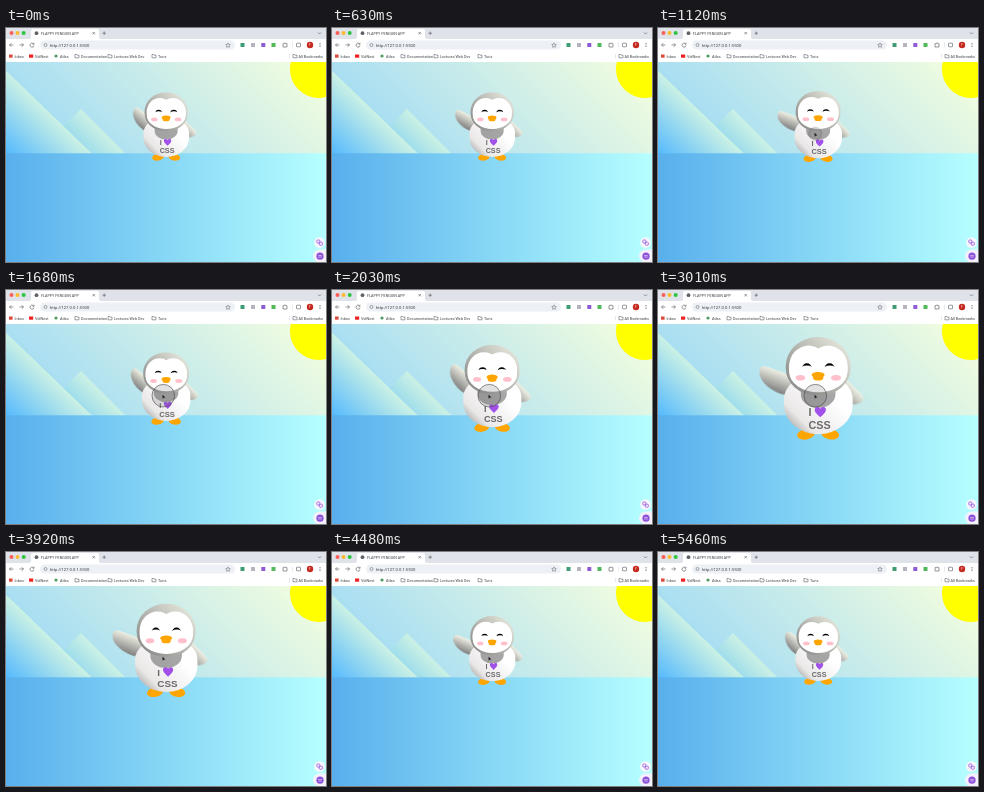
Recreate the animation shown at these times as an HTML page. Size 320x234 px, loop 5530 ms.

```html
<!DOCTYPE html>
<html lang="en">
<head>
<meta charset="utf-8">
<title>Flappy Penguin</title>
<style>
:root { --loop: 5530ms; --face: white; --beak: orange; --skin: gray; --pale: rgb(239, 240, 228); }
html, body { margin: 0; width: 100%; height: 100%; overflow: hidden; background: white; }
.stage { position: relative; width: 320px; height: 234px; overflow: hidden; }
.overlay { position: absolute; inset: 0; }
.overlay text { font-family: Roboto, Inter, sans-serif; fill: #3c4043; }

/* Web page, laid out at full size and scaled down */
.page { position: absolute; top: 34px; width: 320px; height: 200px; overflow: hidden; }
.world {
  position: absolute; width: 1111px; height: 769px;
  transform: scale(.288); transform-origin: 0 0;
  background: linear-gradient(45deg, rgb(118, 201, 255), rgb(247, 255, 222));
}
.world div { position: absolute; }
.mountain { width: 300px; height: 300px; }
.mountain.back {
  left: 110px; top: 225px; transform: rotate(45deg);
  background: linear-gradient(rgb(203, 241, 228), rgb(47, 170, 255));
}
.mountain.front {
  top: 175px; transform: skew(0deg, 44deg);
  background: linear-gradient(rgb(203, 241, 228), rgb(80, 183, 255));
}
.sun { width: 200px; height: 200px; top: -75px; right: -75px; border-radius: 50%; background: yellow; }
.ground {
  top: 317px; width: 100%; height: 452px;
  background: linear-gradient(90deg, rgb(88, 175, 236), rgb(182, 255, 255));
}

.penguin {
  width: 300px; height: 300px; left: 405.5px; top: 75px; z-index: 4;
  animation: grow var(--loop) ease-in-out infinite;
}
.head {
  width: 50%; height: 45%; top: 10%; left: 25%; z-index: 1;
  border-radius: 70% 70% 65% 65%;
  background: linear-gradient(45deg, var(--skin), var(--pale));
}
.face { width: 60%; height: 70%; top: 15%; border-radius: 70% 70% 60% 60%; background: var(--face); }
.face.left { left: 5%; }
.face.right { right: 5%; }
.chin { width: 90%; height: 70%; top: 25%; left: 5%; border-radius: 70% 70% 100% 100%; background: var(--face); }
.eye { width: 15%; height: 17%; top: 45%; border-radius: 50%; background: black; }
.eye.left { left: 25%; }
.eye.right { right: 25%; }
.lid { width: 150%; height: 100%; top: 25%; left: -23%; border-radius: 50%; background: var(--face); }
.blush { width: 15%; height: 10%; top: 65%; border-radius: 50%; background: pink; }
.blush.left { left: 15%; }
.blush.right { right: 15%; }
.beak { height: 10%; border-radius: 50%; background: var(--beak); }
.beak.top { width: 20%; top: 60%; left: 40%; }
.beak.bottom { width: 16%; top: 65%; left: 42%; }

.shirt { top: 190px; left: 127.5px; z-index: 1; font: bold 25px/28.75px "Liberation Sans", Arial, sans-serif; color: #6a6969; }
.shirt svg { position: absolute; left: 13px; top: 1px; }

.body {
  width: 53%; height: 45%; top: 40%; left: 23.5%;
  border-radius: 80% 80% 100% 100%;
  background: linear-gradient(45deg, rgb(134, 133, 133) 0%, rgb(234, 231, 231) 25%, white 67%);
}
.body::before {
  content: ""; position: absolute; width: 50%; height: 45%; top: 10%; left: 25%;
  border-radius: 0 0 100% 100%; background: var(--skin); opacity: .7;
}
.arm {
  width: 30%; height: 60%; z-index: -1; border-radius: 30% 30% 30% 120%;
  background: linear-gradient(90deg, var(--skin), var(--pale));
}
.arm.left { top: 35%; left: 5%; transform-origin: top left; animation: wave var(--loop) linear infinite; }
.arm.right { top: 0; right: -5%; transform: rotate(-45deg); }
.foot { width: 15%; height: 30%; top: 85%; z-index: -1; border-radius: 50%; background: var(--beak); }
.foot.left { left: 25%; transform: rotate(80deg); }
.foot.right { right: 25%; transform: rotate(-80deg); }

.pointer { animation: show var(--loop) step-end infinite; }
.ring {
  fill: rgba(110, 110, 110, .2); stroke: rgba(70, 70, 70, .75); stroke-width: .8;
  transform-origin: 157.3px 105.7px; animation: press var(--loop) linear infinite;
}

@keyframes grow {
  0%, 16.3% { transform: scale(1); }
  20.8%, 27.7% { transform: scale(1.04); }
  45.7%, 64.4% { transform: scale(1.5); }
  82.5%, 100% { transform: scale(1); }
}
@keyframes wave {
  0%, 4%, 14.8%, 25.7%, 38.2%, 49%, 59.9%, 65.5%, 76.3%, 87.7%, 98.5%, 100% { transform: rotate(130deg) scaleX(-1); }
  9.4%, 20.2%, 43.6%, 54.4%, 70.9%, 81.7%, 93.1% { transform: rotate(110deg) scaleX(-1); }
}
@keyframes show {
  0% { opacity: 0; }
  16.3% { opacity: 1; }
  83% { opacity: 0; }
}
@keyframes press {
  0%, 17.5% { transform: scale(0); opacity: 0; }
  20.2% { transform: scale(.55); opacity: 1; }
  27.7%, 64.4% { transform: scale(1); opacity: 1; }
  67%, 100% { transform: scale(0); opacity: 0; }
}
</style>
</head>
<body>
<div class="stage">
  <div class="page">
    <div class="world">
      <div class="mountain back"></div>
      <div class="mountain front"></div>
      <div class="sun"></div>
      <div class="ground"></div>
      <div class="penguin">
        <div class="head">
          <div class="face left"></div>
          <div class="face right"></div>
          <div class="chin"></div>
          <div class="eye left"><div class="lid"></div></div>
          <div class="eye right"><div class="lid"></div></div>
          <div class="blush left"></div>
          <div class="blush right"></div>
          <div class="beak top"></div>
          <div class="beak bottom"></div>
        </div>
        <div class="shirt">I<br>CSS
          <svg width="28" height="26" viewBox="0 0 28 26">
            <path d="M14 25C8 19 1 14 1 7.500C1 0 10-1 14 5C18-1 27 0 27 7.500C27 14 20 19 14 25Z" fill="#a150ea"/>
          </svg>
        </div>
        <div class="body">
          <div class="arm left"></div>
          <div class="arm right"></div>
          <div class="foot left"></div>
          <div class="foot right"></div>
        </div>
      </div>
    </div>
  </div>

  <svg class="overlay" width="320" height="234" viewBox="0 0 320 234">
    <!-- Tab strip -->
    <rect width="320" height="34" fill="white"/>
    <rect width="320" height="11" fill="#dfe2e8"/>
    <circle cx="5.500" cy="5" r="2" fill="#fb5f57"/>
    <circle cx="11.500" cy="5" r="2" fill="#fcbb2e"/>
    <circle cx="17.700" cy="5" r="2" fill="#2ac640"/>
    <path d="M23 11Q25 11 25 9V3Q25 1 27 1H91Q93 1 93 3V9Q93 11 95 11Z" fill="white"/>
    <circle cx="30.500" cy="5.200" r="1.900" fill="#5f6368"/>
    <text x="35" y="6.500" font-size="3.700">FLAPPY PENGUIN APP</text>
    <g fill="none" stroke="#50545a" stroke-width=".6">
      <path d="M86.500 4l2.400 2.400m0-2.400l-2.400 2.400M96.500 5.200h3.400m-1.700-1.700v3.400M312 4.500l1.500 1.500 1.500-1.500"/>
      <!-- Toolbar -->
      <path d="M7.500 17H3.500m1.800-1.800L3.500 17l1.800 1.800M13.500 17h4m-1.800-1.800L17.500 17l-1.800 1.800"/>
      <path d="M27.500 15.800A2 2 0 1 0 28 17.500M28 14.700v1.500h-1.500"/>
    </g>
    <rect x="34" y="12.500" width="195" height="9" rx="4.500" fill="#edf0f5"/>
    <circle cx="39.500" cy="17" r="1.500" fill="none" stroke="#50545a" stroke-width=".5"/>
    <text x="44" y="18.500" font-size="4.200">http://127.0.0.1:5500</text>
    <path d="M222 14.900l.7 1.500 1.600.2-1.200 1.100.3 1.600-1.400-.8-1.400.8.300-1.600-1.200-1.100 1.600-.2z" fill="none" stroke="#50545a" stroke-width=".45"/>
    <rect x="234.500" y="15" width="4" height="4" fill="#3f9c74"/>
    <rect x="245" y="15" width="4" height="4" fill="#b9b3c0"/>
    <rect x="255.300" y="15" width="4" height="4" fill="#8d5bd6"/>
    <rect x="265.500" y="15" width="4" height="4" fill="#51b85b"/>
    <path d="M277 15.700h1.200a.8.800 0 0 1 1.600 0H281v3.300h-4z" fill="none" stroke="#50545a" stroke-width=".6"/>
    <path d="M286.500 14.500v5" stroke="#c9d4e6" stroke-width=".5"/>
    <rect x="290.500" y="15.200" width="4" height="3.600" rx=".6" fill="none" stroke="#50545a" stroke-width=".6"/>
    <circle cx="304" cy="17" r="3.200" fill="#c52a20"/>
    <text x="303" y="18.200" font-size="3.200" style="fill:white">F</text>
    <g fill="#50545a">
      <circle cx="314" cy="15.400" r=".5"/><circle cx="314" cy="17" r=".5"/><circle cx="314" cy="18.600" r=".5"/>
    </g>
    <!-- Bookmarks -->
    <rect x="3" y="26.500" width="3.600" height="3.200" fill="#dc4a3d"/>
    <rect x="23" y="26.500" width="4.200" height="3.200" fill="#ee2020"/>
    <circle cx="50" cy="28" r="1.600" fill="#4d9a62"/>
    <g fill="none" stroke="#50545a" stroke-width=".55">
      <path id="folder" d="M69 26.500h1.500l.5.600h2v2.700h-4z"/>
      <use href="#folder" x="33"/>
      <use href="#folder" x="77"/>
      <use href="#folder" x="218"/>
    </g>
    <path d="M283.500 26v4.500" stroke="#c9d4e6" stroke-width=".5"/>
    <g font-size="3.800">
      <text x="8.500" y="29.500">Inbox</text>
      <text x="29" y="29.500">VidNest</text>
      <text x="54" y="29.500">Atlas</text>
      <text x="75" y="29.500">Documentation</text>
      <text x="108" y="29.500">Lecturas Web Dev</text>
      <text x="152" y="29.500">Turis</text>
      <text x="292.500" y="29.500">All Bookmarks</text>
    </g>

    <!-- Floating buttons -->
    <circle cx="313.500" cy="214.500" r="5.300" fill="#f8f6fd"/>
    <g fill="none" stroke="#9355dc" stroke-width=".8">
      <rect x="310.800" y="212" width="3" height="3" rx=".7"/>
      <rect x="313.300" y="214.200" width="3" height="3" rx=".7"/>
    </g>
    <path d="M320 221.500H313.500a6.500 6.500 0 0 0 0 13H320z" fill="#f4f0fc"/>
    <circle cx="314" cy="228.200" r="3.600" fill="#8d52d8"/>
    <path d="M312.200 227.500h3.600m-3.600 1.500h3.600" stroke="#e9dcfb" stroke-width=".6"/>

    <g class="pointer">
      <circle class="ring" cx="157.300" cy="105.700" r="11.300"/>
      <path d="M156.800 105.200l2 2.100-1.100.1-.8.900z" fill="#111" stroke="#222" stroke-width=".5"/>
    </g>
  </svg>
</div>
</body>
</html>
```
